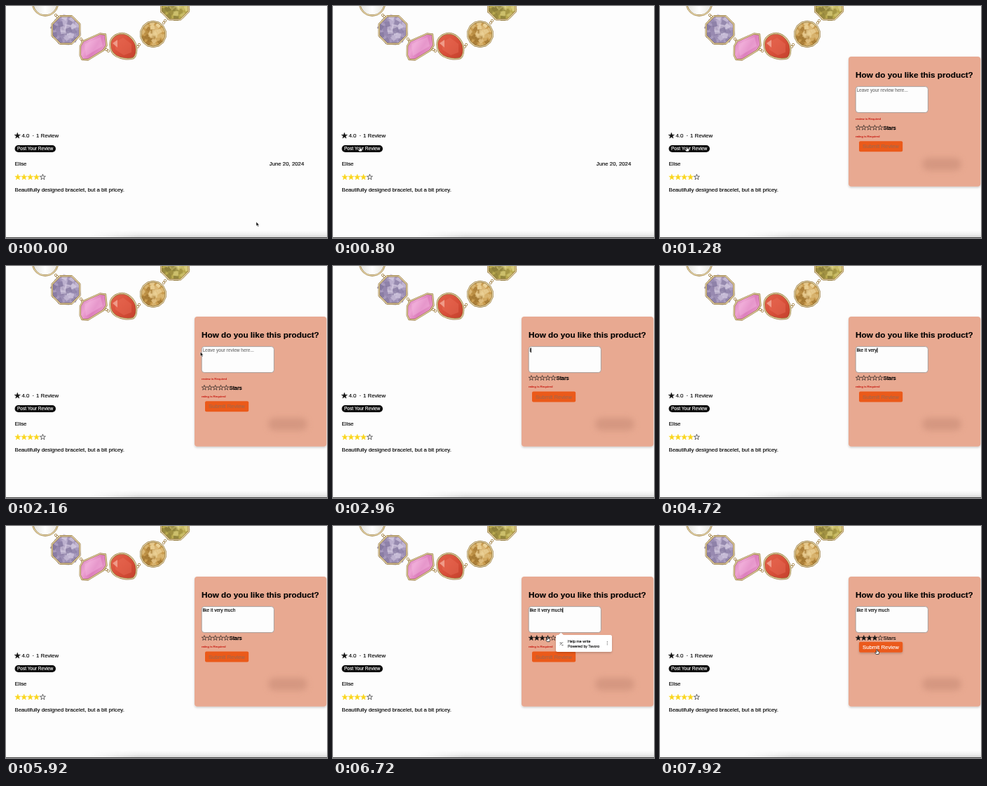
Animation, 458 px wide and 330 px high, one loop 8000 ms. Source, as an HTML page:

```html
<!DOCTYPE html>
<html lang="en">
<head>
<meta charset="utf-8">
<title>Product review form</title>
<style>
  html, body { margin: 0; width: 100%; height: 100%; overflow: hidden; background: #fdfdfd; }
  svg { display: block; width: 458px; height: 330px; }
  text { font-family: "Liberation Sans", Arial, sans-serif; font-size: 7.8px; white-space: pre; stroke: currentColor; stroke-width: .14px; }
  .field { font-size: 6.55px; }
  .error { font-size: 4.4px; fill: #c91f16; color: #c91f16; }
  .tiny { font-size: 5.3px; fill: #222; }
  .title { font-size: 11.76px; font-weight: 700; }
</style>
</head>
<body>
<svg viewBox="0 0 458 330" xmlns="http://www.w3.org/2000/svg">
  <defs>
    <linearGradient id="dock" x2="1"><stop offset="0" stop-color="#666" stop-opacity="0"/><stop offset=".2" stop-color="#666" stop-opacity=".32"/><stop offset="1" stop-color="#666" stop-opacity=".32"/></linearGradient>
    <linearGradient id="fade" x2="0" y2="1"><stop offset="0" stop-color="#000"/><stop offset=".6" stop-color="#555"/><stop offset="1" stop-color="#fff"/></linearGradient>
    <mask id="rise"><rect x="120" y="319" width="338" height="11" fill="url(#fade)"/></mask>
    <linearGradient id="pearl" x2="1"><stop offset="0" stop-color="#e2e2de"/><stop offset=".5" stop-color="#fff"/><stop offset="1" stop-color="#e6e4df"/></linearGradient>
    <linearGradient id="pink" x2="1" y2=".6"><stop offset="0" stop-color="#d07bb4"/><stop offset=".4" stop-color="#eda3d3"/><stop offset=".65" stop-color="#dd7fbd"/><stop offset="1" stop-color="#e79aca"/></linearGradient>
    <linearGradient id="red" x2="1" y2="1"><stop offset="0" stop-color="#e2634c"/><stop offset=".5" stop-color="#d9503a"/><stop offset="1" stop-color="#c2402b"/></linearGradient>
    <filter id="melt" x="-10%" y="-10%" width="120%" height="120%"><feGaussianBlur stdDeviation=".7"/></filter>
    <filter id="soft" x="-30%" y="-80%" width="160%" height="260%"><feGaussianBlur stdDeviation="4.5"/></filter>
    <filter id="shade" x="-20%" y="-20%" width="140%" height="150%"><feDropShadow dx="0" dy="1.5" stdDeviation="1.8" flood-opacity=".2"/></filter>
  </defs>

  <rect width="458" height="330" fill="#fdfdfd"/>
  <g id="necklace" stroke-linejoin="round"></g>

  <g id="summary"></g>
  <text x="22.5" y="187.3">4.0</text>
  <text x="37.6" y="187.3">·</text>
  <text x="43" y="187.3">1 Review</text>
  <rect x="12.5" y="198" width="58.5" height="10" rx="5" fill="#0b0b0b"/>
  <text class="field" x="16" y="205.3" fill="#fff" color="#fff">Post Your Review</text>
  <text x="12.5" y="227.3">Elise</text>
  <text x="375.8" y="227.3">June 20, 2024</text>
  <g id="given"></g>
  <text x="12.5" y="264.2">Beautifully designed bracelet, but a bit pricey.</text>

  <rect x="120" y="319" width="338" height="11" fill="url(#dock)" mask="url(#rise)"/>
  <rect y="329" width="458" height="1" fill="#444"/>

  <g id="panel">
    <rect x="269" y="72" width="188.3" height="184.8" rx="4" fill="#e8a991" filter="url(#shade)"/>
    <rect x="374" y="216" width="56" height="18" rx="9" fill="#cf927c" opacity=".75" filter="url(#soft)"/>
    <text class="title" x="279" y="102">How do you like this product?</text>
    <rect x="279.2" y="114.6" width="103.2" height="37" rx="4" fill="#fdfdfd" stroke="#8c8c8c" stroke-width=".7"/>
    <text id="hint" class="field" x="280.4" y="122" fill="#757575" color="#757575">Leave your review here...</text>
    <text id="typed" class="field" x="280.4" y="122"></text>
    <rect id="caret" y="116.4" width="1" height="6.8"/>
    <text id="needText" class="error" x="279" y="161.7">review is Required</text>
    <g id="rating">
      <g id="picked"></g>
      <text id="starWord" x="318.5" y="176">Stars</text>
      <text id="needStars" class="error" x="279" y="186.8">rating is Required</text>
    </g>
    <g id="submit">
      <rect id="face" x="284" y="192.3" width="62.2" height="15" rx="2" fill="#eb5a1a"/>
      <text id="label" x="289" y="202.4">Submit Review</text>
    </g>
    <g id="help">
      <g filter="url(#shade)">
        <rect x="318" y="155" width="80" height="24" rx="2.5" fill="#fff"/>
        <path d="M321.5 155.2L325.3 151.8L329.1 155.2Z" fill="#fff"/>
      </g>
      <path d="M323.8 169.4L328 165.2M323.5 166.2H326M326.2 169.4H328.6" stroke="#444" stroke-width=".8" fill="none"/>
      <text class="tiny" x="335" y="165.6">Help me write</text>
      <text class="tiny" x="335" y="173">Powered by Tavoro</text>
      <path d="M391.3 164.6V170" stroke="#444" stroke-width="1.1" stroke-dasharray="0 2.1" stroke-linecap="round"/>
    </g>
  </g>

  <g id="pointer" stroke-linejoin="round">
    <path id="arrow" d="M0 0V6L1.4 4.8L2.4 7L3.5 6.5L2.6 4.4H4.4Z" fill="#111" stroke="#fff" stroke-width=".5"/>
    <path id="hand" d="M-.7 .4Q0 -.5 .7 .4V2.6L2.8 3.1Q3.4 3.4 3.2 4.4L2.5 7H-1.2L-2.8 4.6Q-2.6 3.6 -.7 4.6Z" fill="#fff" stroke="#111" stroke-width=".7"/>
    <path id="beam" d="M-1.2 -3.4Q0 -3.4 0 -2.6Q0 -3.4 1.2 -3.4M0 -2.8V2.8M-1.2 3.4Q0 3.4 0 2.6Q0 3.4 1.2 3.4" fill="none" stroke="#111" stroke-width=".7"/>
  </g>
</svg>
<script>
const LOOP = 8000;
const REVIEW = 'like it very much';
const OPEN = 960, FOCUS = 2320, TYPE = 2880, STEP = 158, HELP = 6320, RATE = 6880;
const TYPED = TYPE + (REVIEW.length - 1) * STEP;
const ROW = 13.8; // height freed when an error line goes
const $ = id => document.getElementById(id);

// Regular polygon corners around a centre
function ring(cx, cy, r, n, turn = 0) {
  return Array.from({ length: n }, (_, i) => {
    const a = turn + i * 2 * Math.PI / n;
    return [cx + r * Math.cos(a), cy + r * Math.sin(a)];
  });
}

const outline = pts => 'M' + pts.map(p => p.map(v => v.toFixed(2)).join(' ')).join('L') + 'Z';

function starPath(cx, cy, r) {
  const turn = -Math.PI / 2;
  const tips = ring(cx, cy, r, 5, turn), dents = ring(cx, cy, r * .39, 5, turn + Math.PI / 5);
  return outline(tips.flatMap((p, i) => [p, dents[i]]));
}

function drawStars(id, x, y, pitch, r, count) {
  $(id).innerHTML = Array.from({ length: count }, (_, i) =>
    `<path d="${starPath(x + pitch * (i + .5), y, r)}" stroke-width=".6"/>`).join('');
}

function fillStars(id, n, color) {
  [...$(id).children].forEach((s, i) => {
    s.setAttribute('fill', i < n ? color : 'none');
    s.setAttribute('stroke', i < n ? color : '#111');
  });
}

let seed = 11;
const random = () => (seed = seed * 16807 % 2147483647) / 2147483647;

// Cut stone: soft facets, brighter towards the upper right
function gem(cx, cy, r, n, base, light, dark) {
  const rim = outline(ring(cx, cy, r, n, Math.PI / n));
  let facets = '';
  for (const k of [.84, .52, .2]) {
    ring(cx, cy, r * k, 10, k * 4).forEach(([x, y]) => {
      const glow = (x - cx - (y - cy)) / r * .3 + random() - .5;
      const facet = outline(ring(x, y, r * .24, 4, random() * 3));
      facets += `<path d="${facet}" fill="${glow > 0 ? light : dark}" opacity="${(.25 + Math.abs(glow)).toFixed(2)}"/>`;
    });
  }
  return `<path d="${rim}" fill="${base}"/><g filter="url(#melt)">${facets}</g>` + rimLine(rim);
}

const rimLine = d => `<path d="${d}" fill="none" stroke="#8f7038" stroke-width="2.4"/>` +
  `<path d="${d}" fill="none" stroke="#ecdcae" stroke-width="1.2"/>`;

const link = (x, y) => `<circle cx="${x}" cy="${y}" r="1.7" fill="none" stroke="#a5864a" stroke-width=".9"/>`;

function drawNecklace() {
  const pink = 'M106 57L110 50L134 39.5L142 40.5L143.5 56L139 63L117 76.5L108.5 76L105.8 70Z';
  const red = 'M148.5 55C148.5 45 157 39 166 39C174 39.5 182 46 185.5 56C187 64 185.5 71 182 74C174 76.5 164 75 157 71C151 67 148.5 61 148.5 55Z';
  $('necklace').innerHTML =
    [[71, 13], [73, 15], [107, 47], [109, 50], [143, 62], [146, 64], [188, 58], [190, 55], [225, 24], [227, 21]].map(p => link(...p)).join('') +
    '<circle cx="56" cy="-4.5" r="18" fill="url(#pearl)"/>' + rimLine('M38 -4.5A18 18 0 0 0 74 -4.5') +
    gem(85.5, 34, 21.4, 8, '#a99bbf', '#d3c9e0', '#8578a0') +
    `<path d="${pink}" fill="url(#pink)"/>` +
    '<path d="M112 54L135 44L138 57L114 71Z" fill="#f5bbe0" opacity=".4"/>' + rimLine(pink) +
    `<path d="${red}" fill="url(#red)"/>` +
    '<g filter="url(#melt)"><path d="M155 52L167 45L179 54L179 66L168 70L156 62Z" fill="#ea7159" opacity=".4"/>' +
    '<path d="M152 53L159 48L159 59Z" fill="#f5b3a2" opacity=".7"/></g>' + rimLine(red) +
    gem(210, 40, 18, 14, '#c99c50', '#ecd197', '#a0742f') +
    gem(241, -.5, 21.4, 8, '#b9a94e', '#e3d98f', '#857836');
}

// Pointer stops: time, x, y
const path = [
  [0, 357, 307], [80, 357, 307], [800, 38.5, 200], [1440, 38.5, 200], [2240, 284, 120],
  [6200, 284, 120], [6600, 306.5, 157.5], [7120, 306.5, 157.5], [7600, 309.5, 175.5], [LOOP, 309.5, 175.5]
];

function pointerAt(t) {
  const i = path.findIndex(p => p[0] > t);
  const [t0, x0, y0] = path[i - 1], [t1, x1, y1] = path[i];
  const u = (t - t0) / (t1 - t0), e = u * u * (3 - 2 * u);
  return [x0 + (x1 - x0) * e, y0 + (y1 - y0) * e];
}

const show = (id, on) => $(id).style.display = on ? '' : 'none';
const lift = (id, dy) => $(id).setAttribute('transform', `translate(0 ${-dy})`);

function pointerShape(x, y, open, rated) {
  const inside = (l, t, r, b) => x >= l && x <= r && y >= t && y <= b;
  if (inside(12, 197, 71, 209)) return 'hand';
  if (open && inside(279, 114, 383, 152)) return 'beam';
  if (open && (inside(279, 154, 318, 164) || rated && inside(284, 164, 346, 180))) return 'hand';
  return 'arrow';
}

function render(t) {
  const open = t >= OPEN, written = t >= TYPE, rated = t >= RATE;
  const [x, y] = pointerAt(t);

  show('panel', open);
  const count = written ? Math.min(REVIEW.length, 1 + Math.floor((t - TYPE) / STEP)) : 0;
  $('typed').textContent = REVIEW.slice(0, count);
  show('hint', !written);
  show('needText', !written);
  show('needStars', !rated);

  const blinkStart = t < TYPED ? FOCUS : TYPED;
  const lit = written && t < TYPED || (t - blinkStart) % 1000 < 500;
  show('caret', t >= FOCUS && !rated && lit);
  $('caret').setAttribute('x', 280.4 + (count ? $('typed').getComputedTextLength() : 0));

  lift('rating', written ? ROW : 0);
  lift('submit', ROW * (written + rated));
  const hover = t > 6200 && y > 154 ? Math.floor((x - 279) / 7.85) + 1 : 0;
  fillStars('picked', rated ? 4 : hover, '#111');
  $('starWord').style.strokeWidth = rated ? '.1px' : '.3px';

  const ink = rated ? '#fff' : '#a5674a';
  $('label').setAttribute('fill', ink);
  $('label').setAttribute('color', ink);
  $('face').setAttribute('filter', rated ? 'url(#shade)' : 'none');
  show('help', t >= HELP && !rated);

  show('pointer', !written || t >= 6200);
  $('pointer').setAttribute('transform', `translate(${x} ${y})`);
  const shape = pointerShape(x, y, open, rated);
  for (const id of ['arrow', 'hand', 'beam']) show(id, id === shape);
}

drawNecklace();
drawStars('summary', 12, 184.6, 8.6, 4.3, 1);
drawStars('given', 12.4, 243.5, 8.9, 4.2, 5);
drawStars('picked', 279, 173.2, 7.85, 3.8, 5);
fillStars('summary', 1, '#111');
fillStars('given', 4, '#fad51a');

const start = performance.now();
function tick() {
  render((performance.now() - start) % LOOP);
  requestAnimationFrame(tick);
}
tick();
</script>
</body>
</html>
```
